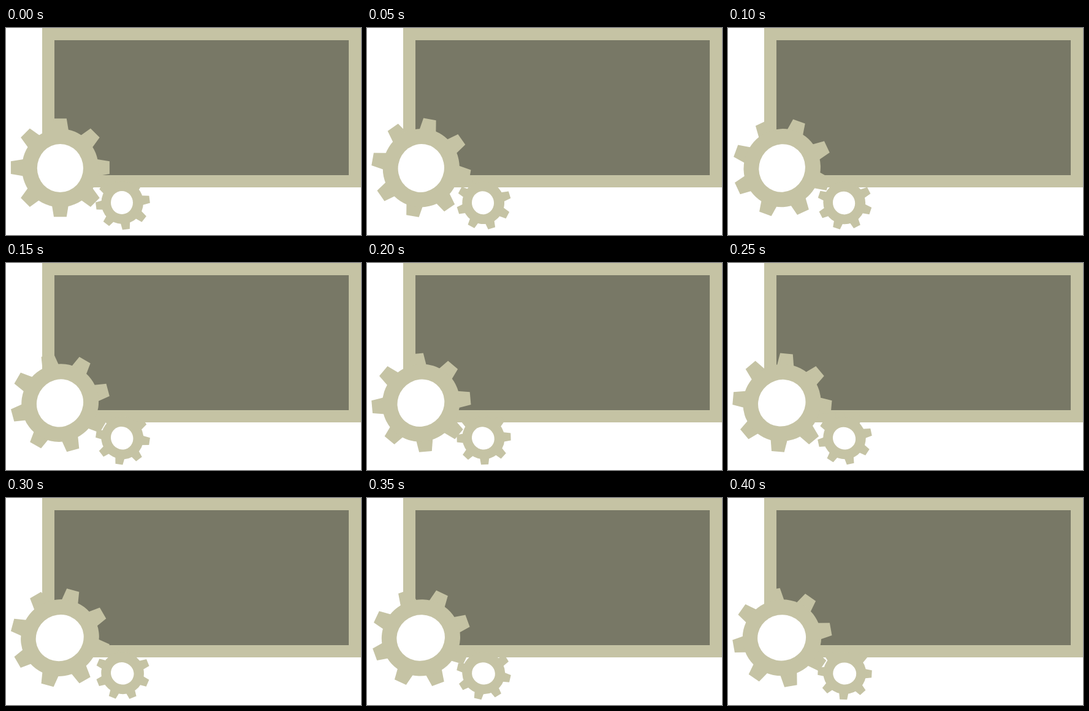
Recreate the animation shown at these times as an HTML page. Size 579 by 339 pixels, loop 0.45 s.

```html
<!DOCTYPE html>
<html lang="en">
<head>
<meta charset="utf-8">
<title>Gears</title>
<style>
  html, body { margin: 0; width: 100%; height: 100%; overflow: hidden; background: #fff; }
  svg { display: block; width: 579px; height: 339px; }
</style>
</head>
<body>
<svg viewBox="0 0 579 339">
  <rect x="59" width="520" height="261" fill="#c5c3a4"/>
  <rect x="79" y="20" width="480" height="221" fill="#787866"/>
</svg>
<script>
const STEP = 50, STEPS = 9, TURN = 10, TEETH = 8;
const svg = document.querySelector('svg');

function add(parent, tag, attrs) {
  const el = document.createElementNS('http://www.w3.org/2000/svg', tag);
  for (const key in attrs) el.setAttribute(key, attrs[key]);
  return parent.appendChild(el);
}

// Tapered teeth around a slightly oval body; the hole turns with the gear.
function makeGear({ x, y, phase, dir, tip, tipHalf, root, rootHalf, body, hole }) {
  const g = add(svg, 'g', { fill: '#c5c3a4' });
  const inner = root - 8;
  const innerHalf = rootHalf + (rootHalf - tipHalf) * 8 / (tip - root);
  const tooth = `M${-innerHalf} ${-inner}L${-tipHalf} ${-tip}H${tipHalf}L${innerHalf} ${-inner}Z`;
  for (let i = 0; i < TEETH; i++) {
    add(g, 'path', { d: tooth, transform: `rotate(${phase + i * 360 / TEETH})` });
  }
  add(g, 'ellipse', body);
  add(g, 'ellipse', { ...hole, fill: '#fff' });
  return step => g.setAttribute('transform', `translate(${x} ${y}) rotate(${dir * TURN * step})`);
}

const gears = [
  makeGear({
    x: 190.5, y: 286, phase: -7, dir: -1,
    tip: 44, tipHalf: 6, root: 34.5, rootHalf: 7.4,
    body: { cx: -0.8, cy: 0, rx: 34.3, ry: 35 },
    hole: { cx: -1.5, cy: 0, rx: 18, ry: 19 }
  }),
  makeGear({
    x: 88.4, y: 228.7, phase: 0, dir: 1,
    tip: 80.5, tipHalf: 10.4, root: 62, rootHalf: 13.4,
    body: { cx: 0, cy: 0.5, rx: 62.5, ry: 64.3 },
    hole: { cx: 0, cy: 0.8, rx: 37.6, ry: 39.5 }
  })
];

function draw(ms) {
  const step = Math.floor(ms / STEP) % STEPS;
  gears.forEach(turn => turn(step));
}

const start = performance.now();
function tick() {
  draw(performance.now() - start);
  requestAnimationFrame(tick);
}
tick();
</script>
</body>
</html>
```
